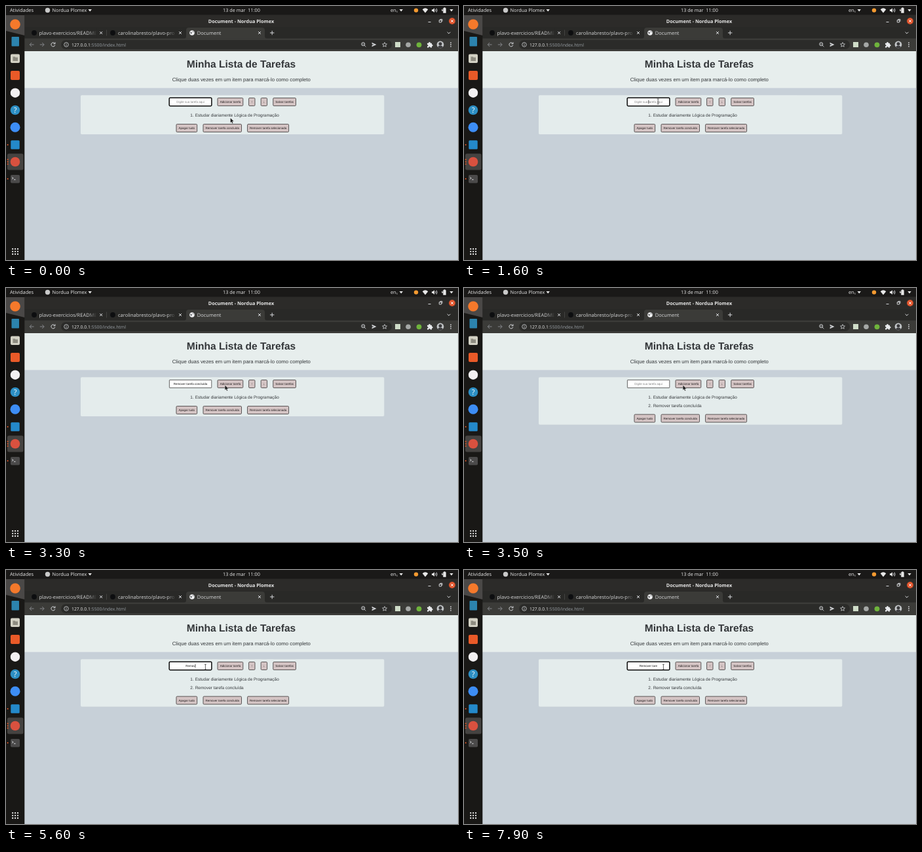
Animation, 690 px wide and 388 px high, one loop 8 s. Source, as an HTML page:

```html
<!DOCTYPE html>
<html lang="pt-BR">
<head>
<meta charset="utf-8">
<title>Minha Lista de Tarefas</title>
<style>
  html, body { margin: 0; width: 100%; height: 100%; overflow: hidden; background: #c7d0d8; }
  svg { display: block; width: 690px; height: 388px; }
  text { text-rendering: geometricPrecision; white-space: pre; }
  .ui { font-family: "Open Sans", "Noto Sans", sans-serif; font-size: 7.3px; fill: #e8e8e8; }
  .tab { font-size: 7.5px; fill: #d6d7d8; }
  .page { font-family: "Liberation Sans", Arial, sans-serif; fill: #333639; }
  .small { font-size: 4.5px; text-anchor: middle; }
  .line { fill: none; stroke: #d5d7da; stroke-width: 1; }
  .btn rect { fill: #d4c4c4; stroke: #4a4647; stroke-width: .9; }
  .btn text { fill: #1c1718; }
</style>
</head>
<body>
<svg viewBox="0 0 690 388" xmlns="http://www.w3.org/2000/svg">
  <defs>
    <linearGradient id="fade">
      <stop offset="0" stop-color="#292927" stop-opacity="0"/>
      <stop offset="1" stop-color="#292927"/>
    </linearGradient>
    <clipPath id="face"><circle cx="663" cy="59" r="5.4"/></clipPath>
  </defs>

  <!-- page -->
  <rect x="28" y="69" width="662" height="319" fill="#c7d0d8"/>
  <rect x="28" y="69" width="662" height="56.3" fill="#e7eeed"/>
  <g class="page">
    <text x="359" y="93.8" font-size="15.55" font-weight="700" text-anchor="middle">Minha Lista de Tarefas</text>
    <text x="359.3" y="115.1" font-size="7.77" text-anchor="middle">Clique duas vezes em um item para marcá-lo como completo</text>
    <rect id="card" x="114" y="136.3" width="463.3" height="59.7" rx="1.8" fill="#e4ecec"/>
    <g font-size="6.46">
      <text x="281.3" y="168.8">1.</text>
      <text x="288.7" y="168.8">Estudar diariamente Lógica de Programação</text>
      <g id="added">
        <text x="281.3" y="181.6">2.</text>
        <text x="288.7" y="181.6">Remover tarefa concluída</text>
      </g>
    </g>
    <g id="top" class="btn"></g>
    <g id="bottom" class="btn"></g>
    <rect id="field" fill="#fff"/>
    <text id="entry" class="small" x="281.5" y="148.1"></text>
    <rect id="caret" y="143.9" width=".7" height="5.2" fill="#111"/>
  </g>

  <!-- system bar -->
  <rect width="690" height="14" fill="#1a1918"/>
  <g class="ui">
    <text x="6" y="9.3" style="font-size:7.5px">Atividades</text>
    <circle cx="63.5" cy="6.5" r="3.7" fill="#c9c9c9"/>
    <text x="70.5" y="9.3">Nordua Plomex</text>
    <text x="359.5" y="9.3" text-anchor="middle">13 de mar  11:00</text>
    <text x="587" y="9.3">en<tspan dy="1" style="font-size:4px">5</tspan></text>
    <path d="M125.5 5h5.4l-2.7 3.4zM600.5 5h5.4l-2.7 3.4zM677.3 5h5.4l-2.7 3.4z"/>
    <circle cx="626" cy="6.6" r="3.2" fill="#f59a30"/>
    <path d="M635.7 5.2q4.3-3.8 8.6 0l-4.3 5.3z"/>
    <path d="M650 5.2h1.7l2.3-2v6.8l-2.3-2H650z"/>
    <path class="line" d="M655.4 4.9q1.2 1.7 0 3.4M657 3.6q2.1 3 0 6"/>
    <path d="M667.3 3.3h1.2v-1h2v1h1.2v7.4h-4.4z"/>
    <path d="M664.6 6.8l1.7-2.8v2h1.2l-1.7 2.8v-2z"/>
  </g>

  <!-- window frame -->
  <rect x="28" y="13.5" width="662" height="19" fill="#2c2b29"/>
  <text class="ui" x="359" y="25.6" text-anchor="middle" font-weight="700">Document - Nordua Plomex</text>
  <path class="line" d="M644.5 24.5h4M661.3 21.5h3.4v3.4h-3.4zM662.5 20.3h3.4v3.4"/>
  <circle cx="681" cy="23" r="4.9" fill="#e2552d"/>
  <path class="line" d="M679.2 21.2l3.6 3.6m0-3.6l-3.6 3.6" style="stroke:#fff"/>
  <rect x="28" y="32" width="662" height="18" fill="#292927"/>
  <path d="M271 50q4 0 4-4v-9q0-4 4-4h112q4 0 4 4v9q0 4 4 4z" fill="#3b3b38"/>
  <path d="M153.5 36.5v9" stroke="#515150" stroke-width=".7"/>
  <circle cx="43" cy="41" r="3.9" fill="#0d0e10"/>
  <text class="ui tab" x="50.5" y="43.6">plavo-exercicios/README</text>
  <circle cx="163" cy="41" r="3.9" fill="#0d0e10"/>
  <text class="ui tab" x="171" y="43.6">carolinabresto/plavo-pro</text>
  <rect x="125" y="34" width="13.5" height="15" fill="url(#fade)"/>
  <rect x="138.4" y="34" width="14" height="15" fill="#292927"/>
  <rect x="246" y="34" width="13.5" height="15" fill="url(#fade)"/>
  <rect x="259.4" y="34" width="14" height="15" fill="#292927"/>
  <circle cx="284" cy="41" r="3.8" fill="#eff0f1"/>
  <path d="M281.2 39.6l2.2.4.4 1.2-1.4 1.8zM284.8 38.3l1.6.8-.8 1.3z" fill="#55565a"/>
  <text class="ui tab" x="291.8" y="43.6">Document</text>
  <g class="line">
    <path d="M143.2 39l4 4m0-4l-4 4M264 39l4 4m0-4l-4 4M385 39l4 4m0-4l-4 4"/>
    <path d="M403 41h6.4M406.2 37.8v6.4M673.6 39.8l2.4 2.4 2.4-2.4"/>
  </g>

  <!-- toolbar -->
  <rect x="28" y="49.5" width="662" height="19.5" fill="#3b3b38"/>
  <rect x="84" y="52" width="505" height="14" rx="7" fill="#2b2b29"/>
  <g class="line">
    <path d="M42.6 59h-6.4m3-3l-3 3 3 3M51.8 59h6.4m-3-3l3 3-3 3" style="stroke:#85878b"/>
    <path d="M74.4 57.2a3 3 0 1 0 .4 2.6M75 55.4v2.4h-2.5"/>
    <circle cx="92" cy="59" r="3.3" stroke-width=".8"/>
    <path d="M92 58.5v2.3M92 56.8v.9" stroke-width=".8"/>
    <circle cx="545.2" cy="58.2" r="2.5"/>
    <path d="M547 60l2.4 2.4M544 58.2h2.4" stroke-width=".8"/>
    <path d="M578 55.6l1 2.3 2.5.2-1.9 1.6.6 2.5-2.2-1.3-2.2 1.3.6-2.5-1.9-1.6 2.5-.2z" stroke-width=".8"/>
  </g>
  <path d="M558.5 55.8l7 3.2-7 3.2.3-2.5 3.4-.7-3.4-.7z" fill="#d5d7da"/>
  <text class="ui" x="100" y="61.6" style="font-size:6.85px">127.0.0.1<tspan fill="#9aa0a6">:5500/index.html</tspan></text>
  <rect x="594" y="55" width="8" height="8" fill="#cfdcc8"/>
  <circle cx="614" cy="59.3" r="3.8" fill="#a5a8a6"/>
  <circle cx="630.5" cy="59.3" r="3.9" fill="#6fb43c"/>
  <path d="M643 56.8h2q0-1.8 1.5-1.8t1.5 1.8h2v2q1.6 0 1.6 1.4t-1.6 1.4v2h-2.2q0-1.5-1.3-1.5t-1.3 1.5H643v-2.1q1.5 0 1.5-1.3t-1.5-1.3z" fill="#e8eaed"/>
  <g clip-path="url(#face)">
    <rect x="657" y="53" width="12" height="12" fill="#c3c6c8"/>
    <circle cx="663" cy="57.8" r="2.5" fill="#3a3a3c"/>
    <ellipse cx="663" cy="64.5" rx="4" ry="4" fill="#3a3a3c"/>
  </g>
  <g fill="#d5d7da"><circle cx="679" cy="56.2" r=".9"/><circle cx="679" cy="59" r=".9"/><circle cx="679" cy="61.8" r=".9"/></g>

  <!-- dock -->
  <rect y="13.5" width="28.3" height="374.5" fill="#191816"/>
  <path d="M0 14h28.3v31L0 38z" fill="#4a4847"/>
  <rect x="2" y="225.5" width="24.5" height="25" rx="2.5" fill="#454341"/>
  <circle cx="14" cy="28" r="7.8" fill="#f5792b"/>
  <rect x="8.5" y="47" width="11.5" height="14.5" rx="1" fill="#2c83ad"/>
  <rect x="7" y="73.5" width="14" height="13.5" rx="2" fill="#d3d1c4"/>
  <path d="M10.5 79.5v-2h3l1 1h3.5v5.5h-7.5z" fill="#8d8b80"/>
  <rect x="7" y="99" width="14" height="14" rx="2" fill="#e95a28"/>
  <circle cx="14" cy="132.7" r="7.2" fill="#f2f0f1"/>
  <circle cx="14" cy="159" r="7.3" fill="#2d8fc4"/>
  <text class="ui" x="14" y="163" text-anchor="middle" style="font-size:11px;fill:#fff">?</text>
  <circle cx="14" cy="185.3" r="7.5" fill="#3d8df5"/>
  <rect x="7.3" y="205.3" width="13.4" height="13.4" rx="1.5" fill="#2489ca"/>
  <circle cx="14" cy="238" r="7.3" fill="#d9513f"/>
  <rect x="7" y="258" width="14" height="12.5" rx="1.8" fill="#4b4a4a"/>
  <path class="line" d="M9.3 261.5l1.8 1.5-1.8 1.5M12 265.2h2.6"/>
  <g fill="#e95a28">
    <circle cx="2.6" cy="212" r="1"/><circle cx="2.6" cy="264" r="1"/>
    <circle cx="2.6" cy="234.5" r="1"/><circle cx="2.6" cy="238" r="1"/><circle cx="2.6" cy="241.5" r="1"/>
  </g>
  <g id="grid" fill="#eee"></g>

  <!-- pointer -->
  <path id="arrow" d="M0 0v7.4l1.7-1.5 1.2 2.7 1.3-.6L3 5.3h2.4z" fill="#151515" stroke="#f4f4f4" stroke-width=".35"/>
  <path id="beam" d="M-1.5-4h1.1q.4 0 .4.5v7q0 .5.4.5h1.1M1.5-4H.4Q0-4 0-3.5M0 3.5q0 .5-.4.5h-1.1" fill="none" stroke="#222" stroke-width=".7"/>
</svg>
<script>
const $ = id => document.getElementById(id);
const LOOP = 8000, STEP = 100, BLINK = 500;
const PHRASE = "Remover tarefa concluída";

function addButton(group, left, right, y, label) {
  $(group).insertAdjacentHTML("beforeend",
    `<rect x="${left}" y="${y}" width="${right - left}" height="12" rx="1.3"/>
     <text class="small" x="${(left + right) / 2}" y="${y + 7.6}">${label}</text>`);
}
[[323, 361.8, "Adicionar tarefa"], [370.6, 380, "↑"], [389.2, 398.6, "↓"], [407.8, 442.5, "Salvar tarefas"]]
  .forEach(([l, r, label]) => addButton("top", l, r, 140.5, label));
[[260, 291.7, "Apagar tudo"], [301, 359.5, PHRASE], [368.6, 431.6, "Remover tarefa selecionada"]]
  .forEach(([l, r, label]) => addButton("bottom", l, r, 180.5, label));

for (let i = 0; i < 9; i++) {
  $("grid").insertAdjacentHTML("beforeend",
    `<circle cx="${10.2 + i % 3 * 3.9}" cy="${371.2 + Math.floor(i / 3) * 3.9}" r="1.15"/>`);
}

// pointer stops: time, x, y
const path = [
  [0, 342.5, 171], [900, 311, 147.3], [1600, 296.2, 146], [2800, 296.2, 146],
  [3100, 334.2, 148.6], [3900, 334.2, 148.6], [4400, 304.4, 148], [LOOP, 304.4, 148]
];
// field edits: time, characters of PHRASE
const edits = [
  [1600, 0], [2500, 24], [3500, 0], [4400, 0], [4900, 1], [5100, 2], [5200, 3], [5400, 4],
  [5600, 5], [5900, 7], [6300, 8], [6700, 9], [7000, 10], [7200, 11], [7300, 12]
];

function pointerAt(t) {
  const i = path.findIndex(p => p[0] > t);
  const [t0, x0, y0] = path[i - 1], [t1, x1, y1] = path[i];
  const k = (t - t0) / (t1 - t0), e = k * k * (3 - 2 * k);
  return [x0 + (x1 - x0) * e, y0 + (y1 - y0) * e];
}

function setAttrs(el, attrs) {
  for (const name in attrs) el.setAttribute(name, attrs[name]);
}

function drawField(t) {
  const focus = t < 3300 || t >= 4400;
  setAttrs($("field"), focus
    ? { x: 249.2, y: 140.2, width: 64.7, height: 12.5, rx: 1.4, stroke: "#0c0c0c", "stroke-width": 1.5 }
    : { x: 249.4, y: 140.5, width: 64.4, height: 12, rx: .6, stroke: "#555", "stroke-width": .9 });

  const [since, count] = edits.filter(e => e[0] <= t).pop() || [-BLINK, 0];
  const entry = $("entry");
  entry.textContent = count ? PHRASE.slice(0, count) : "Digite sua tarefa aqui";
  entry.style.fill = count ? "#111" : "#7d7d7d";
  $("caret").style.display = focus && t - since <= BLINK && since >= 0 ? "" : "none";
  $("caret").setAttribute("x", 281.5 + (count ? entry.getComputedTextLength() / 2 : 0));
}

function draw(time) {
  const t = Math.floor(time % LOOP / STEP) * STEP;
  const grown = t >= 3500;
  $("card").setAttribute("height", grown ? 72.5 : 59.7);
  $("added").style.display = grown ? "" : "none";
  $("bottom").setAttribute("transform", `translate(0 ${grown ? 12.6 : 0})`);
  drawField(t);

  const [x, y] = pointerAt(t);
  const overField = x < 314.5 && y < 153.5;
  $("beam").style.display = overField ? "" : "none";
  $("arrow").style.display = overField ? "none" : "";
  $(overField ? "beam" : "arrow").setAttribute("transform", `translate(${x} ${y})`);
}

const start = performance.now();
function tick() {
  draw(performance.now() - start);
  requestAnimationFrame(tick);
}
tick();
</script>
</body>
</html>
```
